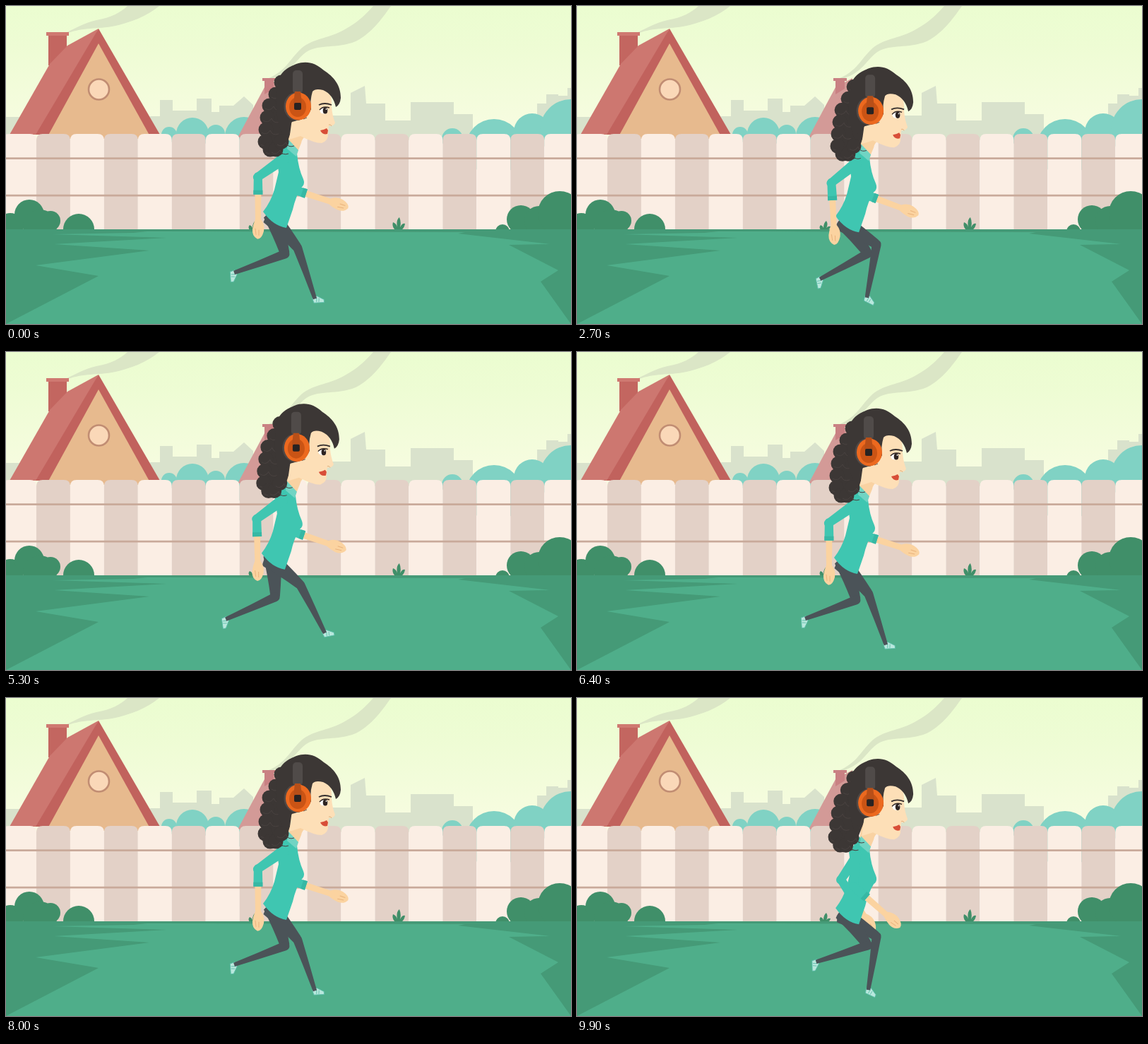
An HTML page that plays this animation: 800 by 450 pixels, repeating every 10 s.

```html
<!DOCTYPE html>
<html lang="en">
<head>
<meta charset="utf-8">
<title>Jogging in the garden</title>
<style>
html, body { margin: 0; width: 100%; height: 100%; overflow: hidden; }
svg { display: block; width: 100vw; height: 100vh; }
</style>
</head>
<body>
<svg viewBox="0 0 800 450">
  <defs>
    <linearGradient id="sky" x2="0" y2="1">
      <stop stop-color="#ebfdd0"/><stop offset=".3" stop-color="#eefcd4"/><stop offset="1" stop-color="#f8fce2"/>
    </linearGradient>
    <g id="legShape" fill="#4b5358">
      <path d="M-14-9Q0-18 12-8Q10 22 6.500 48Q4 55-2 54Q-7 52-7 47Q-9 20-14-9Z"/>
    </g>
    <g id="shinShape">
      <path d="M-3 75L4 74L12 82L11 86L-3 82Z" fill="#b9e8dd" stroke="#58bca8" stroke-width=".8"/>
      <path d="M3 76L1 82M6 78L4 83" stroke="#58bca8" stroke-width=".8"/>
      <path d="M-6.500 0Q-5-7 1-6Q6.500-5 6.500 1Q5 40 3 77L-2.500 77Q-4 38-6.500 0Z" fill="#4b5358"/>
    </g>
    <path id="sleeve" d="M-8-6Q0-12 8-5L6 44Q4 50-1 50Q-6 49-6 44Z" fill="#3fc6b1"/>
    <g id="forearm">
      <path d="M-4.500 20L4.500 20L4 60Q10 68 8 77Q5 88-1 88Q-9 84-8 74Q-7 67-4 60Z" fill="#fbd3a0"/>
      <path d="M-4 73L-3 82M1 75L1 83" stroke="#e9b37d" fill="none"/>
      <path d="M-6-1Q-5-7 1-6Q6-5 6 1L6.500 25L-6.500 25Z" fill="#3fc6b1"/>
      <path d="M-6.500 19L6.500 19L6.500 25L-6.500 25Z" fill="#37b8a4"/>
    </g>
  </defs>

  <rect width="800" height="190" fill="url(#sky)"/>
  <path fill="#d9e2cc" d="M0 157H20V190H0ZM190 190V162L205 156H218V133H236V148H270V131H291V150H302V141H322L337 128L350 140V190ZM440 190V155H488V123L508 113L510 138H537V162H573V136H634V153H661V190ZM752 190V138H765V125H782V127H795V116H800V190Z"/>
  <g fill="#dbe6c6">
    <path d="M80 40C98 32 110 24 128 20C148 17 164 8 172 0H217C200 14 176 24 150 29C124 33 106 30 84 40Z"/>
    <path d="M370 103C396 92 400 78 416 62C430 48 452 46 470 38C492 28 508 14 520 0H545C530 22 512 44 490 52C464 60 440 54 424 66C408 78 404 96 372 104Z"/>
  </g>
  <g id="hedge" fill="#80d2c4"></g>
  <path fill="#d39a97" d="M328 186L366 115L390 102V186Z"/>
  <path fill="#c98183" d="M366 105H379V117L366 125ZM363 102H382V106H363Z"/>

  <path fill="#c36660" d="M60 41H86V84H60Z"/>
  <path fill="#cf7971" d="M57 37H89V42H57Z"/>
  <path fill="#cd7770" d="M5 182L62 82L87 56L131 32L56 182Z"/>
  <path fill="#c1625d" d="M131 32L218 182H42Z"/>
  <path fill="#e7ba8e" d="M131 53L206 188H57Z"/>
  <circle cx="131.500" cy="118" r="14.500" fill="#fad8b8" stroke="#c18d73" stroke-width="2.600"/>

  <g id="fence"></g>
  <path fill="#c9aa9a" d="M0 214.300H800V217H0ZM0 266.700H800V269.500H0Z"/>

  <g fill="#408f69">
    <g id="shrubs"></g>
    <path d="M551 317Q546 312 548 306Q553 308 554 313Q552 303 557 299Q560 306 558 313Q561 307 565 308Q564 314 560 317ZM345 317Q342 313 345 310Q348 311 349 314Q349 307 353 304Q356 309 353 314Q356 311 359 312Q358 316 355 317Z"/>
  </g>
  <path fill="#4fae8a" d="M0 316H800V450H0Z"/>
  <path fill="#459a77" d="M0 316H800V450L757 390L782 374L712 338L770 337L640 322L650 320L200 319L180 321L65 323L228 328L68 337L203 346L42 367L131 382L0 450Z"/>

  <g id="runner">
    <g id="farArm"><use href="#sleeve"/><g><use href="#forearm"/></g></g>
    <g id="farLeg"><use href="#legShape"/><g><use href="#shinShape"/></g></g>
    <g id="nearLeg"><use href="#legShape"/><g><use href="#shinShape"/></g></g>
    <path fill="#f9d2a2" d="M404 150L427 182Q419 187 418 194L411 211L397 200Z"/>
    <path fill="#3fc6b1" d="M398 190L412 209Q414 230 421 245Q424 253 418 257Q410 270 406 288L397 314Q378 311 364 291Q375 277 380 260L386 235L383 212Z"/>
    <path fill="#70d4c3" d="M400 189L414 204L411 213L398 202Z"/>
    <g id="nearArm"><use href="#sleeve"/><g><use href="#forearm"/></g></g>
    <g id="hair" fill="#3c3735"></g>
    <path fill="#fddfb7" d="M418 112L457 116Q462 132 461 143Q462 155 466 165Q465 170 457 170L456 181Q457 190 447 194Q436 194 417 184L401 189L405 160Z"/>
    <path fill="#3c3735" d="M387 101C395 87 405 85 411 82C425 77 438 80 450 91C464 100 474 112 474 130Q473 140 467 143Q463 125 449 119Q438 116 434 121Q430 134 432 146C428 156 418 161 405 164L390 180Q377 145 387 101Z"/>
    <path fill="none" stroke="#332e2d" d="M443 140Q451 136 461 140" stroke-width="1.800"/>
    <ellipse cx="450" cy="148" rx="5.500" ry="4.500" fill="#fff"/>
    <ellipse cx="452" cy="148" rx="3.300" ry="4.600" fill="#2d2422"/>
    <circle cx="453.500" cy="146" r=".9" fill="#fff"/>
    <path fill="none" stroke="#2d2422" stroke-width="1.500" d="M444 147Q449 141 458 144"/>
    <path fill="#d84e38" d="M445 176Q451 175 454 173L456 176L455 181Q448 183 445 176Z"/>
    <path fill="none" stroke="#deb07d" d="M457 168Q460 167 461 170"/>
    <path fill="none" stroke="#5a504b" d="M421 160L426 158"/>
    <rect x="406" y="91" width="14" height="33" rx="5" fill="#504b49"/>
    <ellipse cx="411.500" cy="142" rx="18" ry="20" fill="#514946"/>
    <ellipse cx="414" cy="142" rx="18" ry="19.500" fill="#ec691f"/>
    <ellipse cx="413" cy="143" rx="12" ry="14" fill="#ca5415"/>
    <path fill="#b84f18" d="M409 121H417L419 138H407Z"/>
    <rect x="408" y="137" width="10" height="10" rx="2" fill="#282322"/>
  </g>
</svg>
<script>
const $ = id => document.getElementById(id);
const discs = list => list.map(([x, y, r]) => `<circle cx="${x}" cy="${y}" r="${r}"/>`).join('');

$('hedge').innerHTML = discs([[231, 182, 11], [264, 181, 23], [297, 181, 13], [337, 184, 27],
  [632, 188, 15], [691, 200, 40], [745, 178, 26], [800, 176, 44]]);
$('shrubs').innerHTML = discs([[6, 312, 19], [33, 295, 21], [63, 304, 14], [103, 316, 22], [48, 312, 24],
  [703, 319, 10], [729, 302, 20], [755, 304, 21], [784, 293, 31]]);

// Fence planks
let planks = '';
for (let i = 0; i < 17; i++) {
  const x = -5 + i * 47.95;
  planks += `<path fill="${i % 2 ? '#e3d1c7' : '#fbeee4'}" d="M${x} 317V190Q${x} 181 ${x + 9} 181H${x + 39}Q${x + 48} 181 ${x + 48} 190V317Z"/>`;
}
$('fence').innerHTML = planks;

// Curly hair down the back
const curls = [[390, 108], [382, 125], [373, 141], [370, 158], [368, 175], [367, 192], [374, 203], [382, 203], [390, 192]];
$('hair').innerHTML = '<path d="M390 101L410 100L408 165L400 188L384 213L370 207L371 160Z"/>' +
  curls.map(([x, y]) => `<circle cx="${x}" cy="${y}" r="10.500"/>
    <path fill="none" stroke="#494240" d="M${x - 6} ${y + 4}q7 5 12-3q3 8 12 5"/>`).join('');

// Sixteen poses per stride; angles in degrees forward from straight down
const POSES = 16;
const thigh = [40, 57, 46, 28, 10, 0, -6, 3, 17, 36, 50, 61, 67, 67, 60, 50];
const shin = [16, -9, -20, -26, -29, -39, -51, -66, -70, -62, -46, -26, -8, 9, 21, 23];

function limb(id, x, y, length, upper, lower) {
  const el = $(id);
  el.setAttribute('transform', `translate(${x} ${y}) rotate(${-upper})`);
  el.lastElementChild.setAttribute('transform', `translate(0 ${length}) rotate(${upper - lower})`);
}

function draw(now) {
  const step = Math.floor(now % 10000 / 100);
  const near = step * 3 % POSES, far = (near + POSES / 2) % POSES;
  const turn = 2 * Math.PI * near / POSES;
  const bob = 9 * Math.sin(2 * turn);
  const swing = Math.cos(turn + 0.1);

  $('runner').setAttribute('transform', `translate(${bob / 3} ${bob})`);
  $('hair').setAttribute('transform', `rotate(${1 - Math.cos(turn)} 410 100)`);
  limb('nearLeg', 381, 304, 49, thigh[near], shin[near] * 1.17);
  limb('farLeg', 381, 304, 49, thigh[far], shin[far]);
  limb('nearArm', 392, 217, 43, -27.5 - 27.5 * swing, 26 - 26 * swing);
  limb('farArm', 396, 215, 43, -15 + 22 * swing, 51 + 21 * swing);
  requestAnimationFrame(draw);
}
requestAnimationFrame(draw);
</script>
</body>
</html>
```
